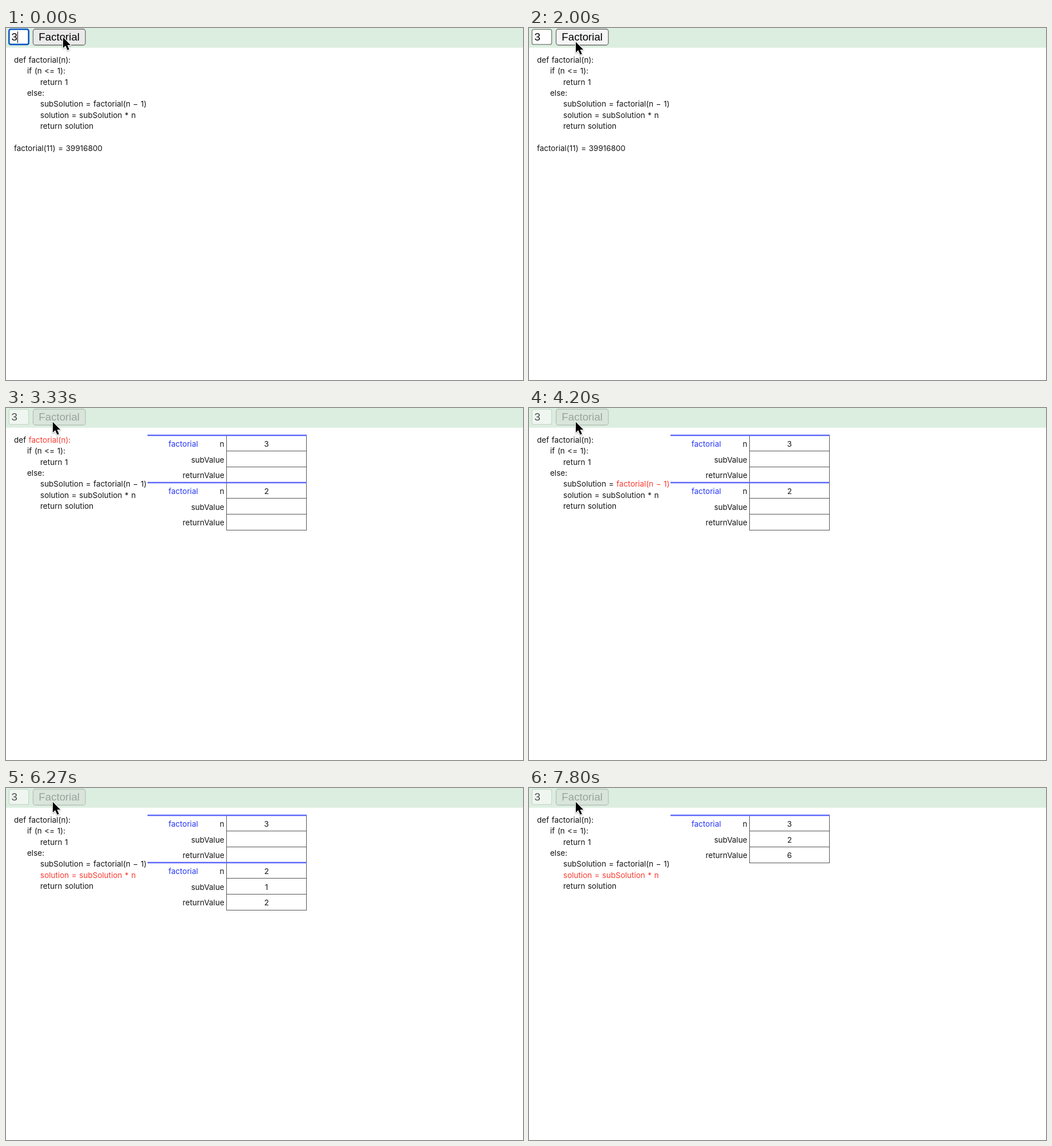
These frames come from a looping animation (906 by 618 pixels, 8 s). An HTML page:

```html
<!DOCTYPE html>
<html lang="en">
<head>
<meta charset="utf-8">
<title>Recursive factorial</title>
<style>
  html, body { margin: 0; width: 100%; height: 100%; overflow: hidden; background: #fff; }
  svg { display: block; width: 906px; height: 618px; }
  text { font: 13.5px Inter, sans-serif; font-feature-settings: "calt" 0; word-spacing: 0.8px; fill: #151515; }
  .control text { font: 18.7px "Liberation Sans", Arial, sans-serif; fill: #000; }
  #input rect { fill: #fff; stroke: #0b57c4; stroke-width: 2.6; }
  #button rect { fill: #efefef; stroke: #6e6e6e; stroke-width: 1.3; }
  #button.hover rect { fill: #ebeaeb; }
  #button.press rect { fill: #f5f5f5; }
  #input.blur rect { stroke: #767676; stroke-width: 1.3; }
  #input.disabled rect { fill: #eff6f0; stroke: #cbd6cc; stroke-width: 1.3; }
  #input.disabled text { fill: #4a4d4a; }
  #button.disabled rect { fill: #d9e5db; stroke: #b7c3b9; }
  #button.disabled text { fill: #99a39b; }
  .red { fill: #fa392f; }
  .call { fill: #2436f5; }
  .label { text-anchor: end; }
  .value { text-anchor: middle; }
  .cell { fill: none; stroke: #555; }
  .top { stroke: #5c68fa; stroke-width: 2.4; }
</style>
</head>
<body>
<svg viewBox="0 0 906 618">
  <rect width="906" height="34.6" fill="#dceee0"/>
  <g id="input" class="control">
    <rect x="5.3" y="2.3" width="34.4" height="26.6" rx="3"/>
    <text x="9.4" y="22.2">3</text>
    <path id="caret" d="M20.5 6V26" stroke="#000"/>
  </g>
  <g id="button" class="control">
    <rect x="47.5" y="2" width="91.6" height="28" rx="4"/>
    <text x="93.2" y="22.2" text-anchor="middle">Factorial</text>
  </g>
  <g id="code">
    <text x="14">def <tspan id="def">factorial(n):</tspan></text>
    <text x="37">if <tspan id="test">(n &lt;= 1):</tspan></text>
    <text x="60" id="base">return 1</text>
    <text x="37">else:</text>
    <text x="60" id="assign">subSolution = <tspan id="recurse">factorial(n − 1)</tspan></text>
    <text x="60" id="multiply">solution = subSolution * n</text>
    <text x="60" id="result">return solution</text>
  </g>
  <text id="answer" x="14" y="215.5">factorial(11) = 39916800</text>
  <g id="stack"></g>
  <g id="cursor">
    <path d="M0 0V18.6L4.3 14.6L7.7 22.3L10.8 21L7.5 13.4H13.2Z" stroke="#fff" stroke-width="2.4"
      stroke-linejoin="round" paint-order="stroke" style="filter:drop-shadow(0 1px 1px #0005)"/>
  </g>
</svg>
<script>
const LOOP = 8000;
const LINE_STEP = 19.35, FRAME_STEP = 83, ROW = 28, TEXT_ROW = 27.7;
const $ = id => document.getElementById(id);

// Each entry lists what changes at its time; positions hold until the next one.
const at = (x, y) => ({ x, y });
const timeline = [
  [0, { ...at(100, 16.5), caret: true, input: '', button: 'hover', red: '', depth: 0, answer: true, values: [[], [], []] }],
  [200, { caret: false }],
  [470, { ...at(130, 40), button: '' }],
  [560, at(200, 92)],
  [650, at(280, 152)],
  [730, { ...at(342, 202), caret: true }],
  [930, at(430, 285)],
  [1000, at(570, 420)],
  [1070, at(690, 540)],
  [1130, at(749, 588)],
  [1200, { ...at(583, 482), caret: false }],
  [1400, at(586, 485.5)],
  [1530, at(520, 430)],
  [1600, at(340, 270)],
  [1670, at(190, 140)],
  [1730, at(96, 50)],
  [1870, { ...at(82, 24.5), button: 'hover' }],
  [1930, { input: 'blur', button: 'press' }],
  [2070, { input: 'disabled', button: 'disabled', answer: false, depth: 1, red: 'def' }],
  [2330, { red: 'test' }],
  [2870, { red: 'recurse' }],
  [3330, { red: 'def', depth: 2 }],
  [3730, { red: 'test' }],
  [4200, { red: 'recurse' }],
  [4470, { red: 'def', depth: 3 }],
  [4930, { red: 'test' }],
  [5200, { red: 'base' }],
  [5600, { red: '', depth: 2 }],
  [6000, { red: 'assign', values: [[], [1], []] }],
  [6270, { red: 'multiply', values: [[], [1, 2], []] }],
  [6730, { red: 'result' }],
  [7070, { depth: 1 }],
  [7530, { red: 'assign', values: [[2], [], []] }],
  [7800, { red: 'multiply', values: [[2, 6], [], []] }]
];

const lines = [...$('code').children];
lines.forEach((line, i) => line.setAttribute('y', 60.8 + i * LINE_STEP));

const labels = ['n', 'subValue', 'returnValue'];
$('stack').innerHTML = [3, 2, 1].map((n, i) => `
  <g transform="translate(0 ${48 + i * FRAME_STEP})">
    ${labels.map((label, row) => `
      <rect class="cell" x="386.5" y="${row * ROW - 0.5}" width="140" height="${ROW}"/>
      <text class="label" x="382.5" y="${row * TEXT_ROW + 19.8}">${label}</text>
      <text class="value" x="456.5" y="${row * TEXT_ROW + 19.8}">${row ? '' : n}</text>`).join('')}
    <text class="call" x="284.7" y="19.8">factorial</text>
    <path class="top" d="M248 0H527"/>
  </g>`).join('');
const frames = [...$('stack').children].map(group => ({
  group, cells: [...group.querySelectorAll('.value')].slice(1)
}));
const highlights = ['def', 'test', 'base', 'assign', 'recurse', 'multiply', 'result'].map($);

const show = (element, visible) => { element.style.display = visible ? '' : 'none'; };

function render(time) {
  const state = Object.assign({}, ...timeline.filter(([start]) => start <= time).map(([, change]) => change));
  $('cursor').setAttribute('transform', `translate(${state.x} ${state.y})`);
  $('input').setAttribute('class', `control ${state.input}`);
  $('button').setAttribute('class', `control ${state.button}`);
  show($('caret'), state.caret);
  show($('answer'), state.answer);
  highlights.forEach(part => part.classList.toggle('red', part.id === state.red));
  frames.forEach(({ group, cells }, i) => {
    show(group, i < state.depth);
    cells.forEach((cell, row) => { cell.textContent = state.values[i][row] ?? ''; });
  });
}

const started = performance.now();
function tick() {
  render((performance.now() - started) % LOOP);
  requestAnimationFrame(tick);
}
tick();
</script>
</body>
</html>
```
